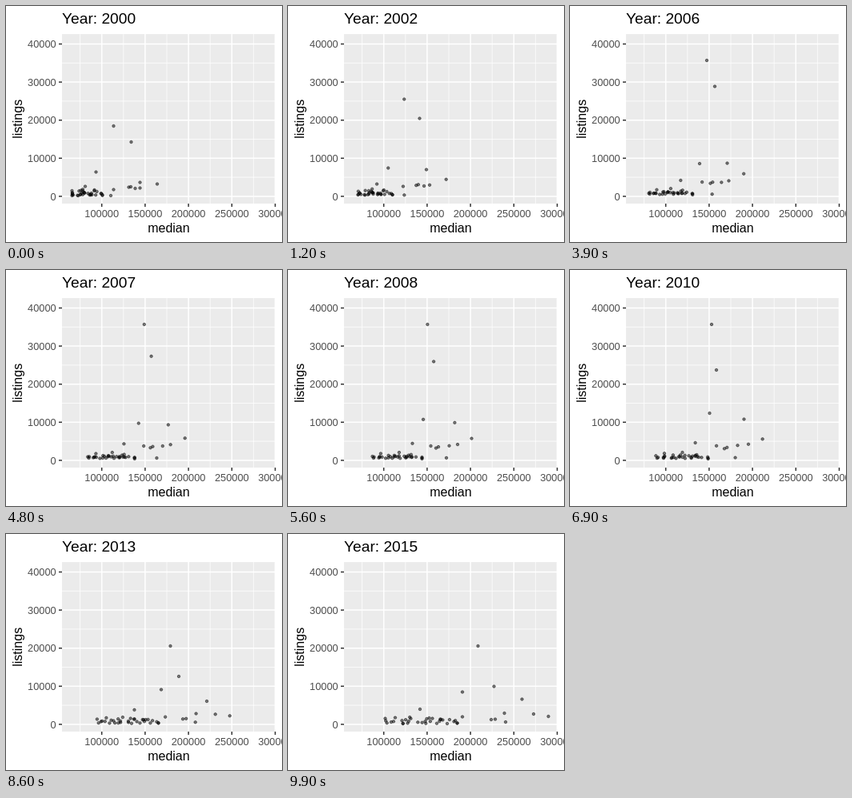
Recreate the animation shown at these times as an HTML page. Size 345 by 295 pixels, loop 10000 ms.

```html
<!DOCTYPE html>
<html lang="en">
<head>
<meta charset="utf-8">
<title>Listings by median</title>
<style>
html, body { margin: 0; width: 345px; height: 295px; overflow: hidden; background: #fff; }
svg { display: block; }
text { font-family: "Liberation Sans", Arial, sans-serif; font-size: 16px; }
.tick { font-size: 12.8px; fill: #4d4d4d; }
.title { font-size: 19.2px; }
.dot { fill: #000; stroke: #000; fill-opacity: .5; stroke-opacity: .5; stroke-width: .95; }
</style>
</head>
<body>
<svg id="chart" width="345" height="295" viewBox="0 0 345 295"></svg>
<script>
const chart = document.getElementById("chart");

function add(tag, attrs, text) {
  const el = document.createElementNS("http://www.w3.org/2000/svg", tag);
  for (const key in attrs) el.setAttribute(key, attrs[key]);
  if (text) el.textContent = text;
  chart.append(el);
  return el;
}

function line(x1, y1, x2, y2, stroke, width) {
  add("line", { x1, y1, x2, y2, stroke, "stroke-width": width });
}

// Panel, grid and labels
const LEFT = 70, RIGHT = 336.6, TOP = 35.1, BOTTOM = 247;
const xAt = value => 119.7 + (value - 100000) * 54.2 / 50000;
const yAt = value => 237.9 - value * 47.6 / 10000;
const vLine = (value, width) => line(xAt(value), TOP, xAt(value), BOTTOM, "#fff", width);
const hLine = (value, width) => line(LEFT, yAt(value), RIGHT, yAt(value), "#fff", width);

add("rect", { x: LEFT, y: TOP, width: RIGHT - LEFT, height: BOTTOM - TOP, fill: "#ebebeb" });
for (let v = 75000; v < 300000; v += 50000) vLine(v, .75);
for (let v = 5000; v < 40000; v += 10000) hLine(v, .75);
for (let v = 100000; v <= 300000; v += 50000) {
  vLine(v, 1.5);
  line(xAt(v), BOTTOM, xAt(v), BOTTOM + 4, "#333", 1.5);
  add("text", { class: "tick", x: xAt(v), y: 264, "text-anchor": "middle" }, String(v));
}
for (let v = 0; v <= 40000; v += 10000) {
  hLine(v, 1.5);
  line(LEFT - 4, yAt(v), LEFT, yAt(v), "#333", 1.5);
  add("text", { class: "tick", x: 62.7, y: yAt(v) + 4.6, "text-anchor": "end" }, String(v));
}
add("text", { x: 203.4, y: 283, "text-anchor": "middle" }, "median");
add("text", { transform: "translate(19.5 141.3) rotate(-90)", "text-anchor": "middle" }, "listings");
const title = add("text", { class: "title", x: 70, y: 22 });

// Motion: every dot has a function from step to [x, y]
const STEP = 100, STEPS = 100, LAST = STEPS - 1, CRISIS = 56;
const dots = [];
const dot = place => dots.push({ place, el: add("circle", { class: "dot", r: 1.75 }) });
const mix = (a, b, part) => a + (b - a) * part;

// Prices climb evenly up to the crisis, then stall and pick up again
function price(start, mid, end, step) {
  if (step < CRISIS) return mix(start, mid, step / CRISIS);
  return mix(mid, end, ((step - CRISIS) / (LAST - CRISIS)) ** 1.8);
}

// Listings rise early, hold, and fall back
const boom = step => Math.max(0, Math.min(step / 28, 1, (86 - step) / 17));

function market(xs, y0, y1, lift) {
  dot(step => [price(...xs, step), mix(y0, y1, step / LAST) - lift * boom(step)]);
}

// The largest markets follow a few waypoints
const KEYS = [0, 24, 39, 69, 86, 99];
function leader(xs, ys) {
  dot(step => {
    const k = Math.max(0, KEYS.findIndex(key => key >= step) - 1);
    const part = (step - KEYS[k]) / (KEYS[k + 1] - KEYS[k]);
    return [mix(xs[k], xs[k + 1], part), mix(ys[k], ys[k + 1], part)];
  });
}

leader([134, 155.5, 170.5, 176.5, 205, 237], [150, 83, 68, 68, 140, 140]);
leader([156, 172, 180.5, 182.5, 215.5, 257], [170, 111, 100.5, 125, 178, 190.5]);
leader([112, 137.5, 161.5, 174, 193.5, 217.5], [207.5, 197.5, 197, 179, 194.5, 197.5]);
leader([167, 178, 196, 217, 250.5, 292], [220.5, 188.5, 196.5, 186.5, 209, 206.5]);

market([188.5, 229, 325], 222.5, 228, 15);
market([167, 211.5, 306.5], 227.5, 225, 8);
market([161, 201, 270], 228, 224, 6);
market([155.5, 187.5, 258.5], 226, 231.5, 8);
market([153, 184.5, 253.5], 226.5, 232, 7);
market([134, 178, 217.5], 229.5, 228.5, 9);
market([98.5, 155, 164.5], 225.5, 219, 5);
market([130.5, 197.5, 271.5], 237, 235, 1);

// Small markets: a seeded crowd that spreads out to the right
let seed = 11;
function random(low, high) {
  seed = seed * 16807 % 2147483647;
  return mix(low, high, seed / 2147483647);
}

const CROWD = 33;
for (let i = 0; i < CROWD; i++) {
  const rank = () => Math.max(0, Math.min(1, i / (CROWD - 1) + random(-.12, .12)));
  const xs = [82 + 38 * rank() ** 1.3, 105 + 62 * rank(), 121 + 90 * rank()];
  const height = () => 237 - 8 * random(0, 1) ** 1.5;
  market(xs, height(), height(), random(-.5, 1.5));
}

function draw(step) {
  title.textContent = "Year: " + Math.round(2000 + 15 * step / LAST);
  for (const { place, el } of dots) {
    const [x, y] = place(step);
    el.setAttribute("cx", x + .5);
    el.setAttribute("cy", y);
  }
}

const start = performance.now();
let shown = -1;
function tick() {
  const elapsed = Math.max(0, performance.now() - start);
  const step = Math.floor(elapsed / STEP) % STEPS;
  if (step !== shown) draw(shown = step);
  requestAnimationFrame(tick);
}
tick();
</script>
</body>
</html>
```
